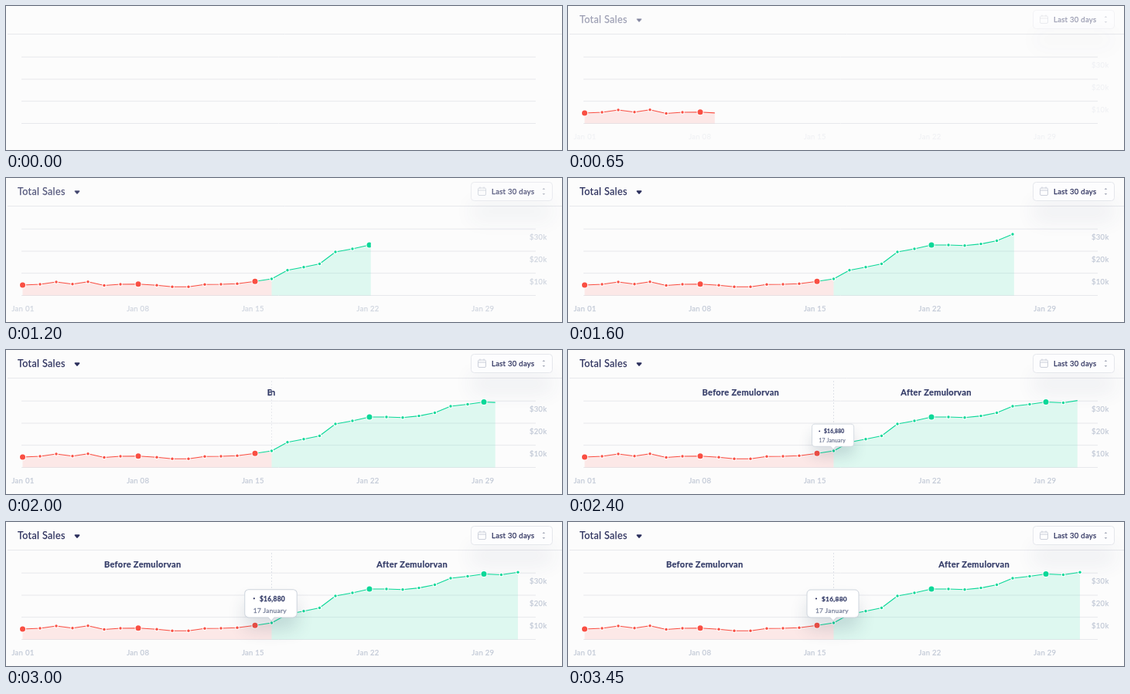
An HTML page with a canvas for the animation above (3.5 s loop, 719 by 187 pixels).

```html
<!DOCTYPE html>
<html lang="en">
<head>
<meta charset="utf-8">
<title>Total Sales</title>
<style>
  html, body { margin: 0; width: 100%; height: 100%; overflow: hidden; background: #fcfcfc; }
  canvas { display: block; width: 719px; height: 187px; }
</style>
</head>
<body>
<canvas id="chart"></canvas>
<script>
const W = 719, H = 187, LOOP = 3500, STEP = 50;
const BASE = 152.5, SPLIT = 343.5;
const INK = '#2b2f5c', RED = '#f94f43', GREEN = '#0bd898', GRID = '#e7e8ec', AXIS = '#c3cad7';
const BRAND = 'Zemulorvan';

const points = [
  [21.5, 139], [44, 138], [65, 135], [86, 137.7], [106, 134.8], [127, 139.5], [148, 138], [171, 137.8],
  [195, 139.2], [215, 141.2], [236, 141.2], [257, 138.2], [278, 138], [299, 137.3], [322, 134.3],
  [343.5, 131], [364, 119.8], [385, 115.8], [405.5, 111.5], [426, 96], [448, 92], [470, 87],
  [492, 87], [513, 87.7], [534, 85.6], [554.5, 81.5], [575, 73], [597, 70.5], [618, 67.5],
  [640.5, 68.5], [662, 65.2]
];

const dpr = window.devicePixelRatio || 1;
const canvas = document.getElementById('chart');
canvas.width = W * dpr;
canvas.height = H * dpr;
const ctx = canvas.getContext('2d');

const progress = (t, start, duration) => Math.min(1, Math.max(0, (t - start) / duration));

// cubic-bezier(x1, 0, x2, 1) solved by bisection
function ease(x, x1, x2) {
  let lo = 0, hi = 1, s = 0.5;
  for (let i = 0; i < 24; i++) {
    s = (lo + hi) / 2;
    const bx = 3 * (1 - s) ** 2 * s * x1 + 3 * (1 - s) * s * s * x2 + s ** 3;
    if (bx < x) lo = s; else hi = s;
  }
  return s * s * (3 - 2 * s);
}

function layer(alpha, draw) {
  if (alpha <= 0) return;
  ctx.save();
  ctx.globalAlpha = alpha;
  draw();
  ctx.restore();
}

function clipX(left, right) {
  ctx.beginPath();
  ctx.rect(left, 0, right - left, H);
  ctx.clip();
}

function text(str, x, y, size, color, { weight = 400, align = 'left' } = {}) {
  ctx.font = `${weight} ${size}px Lato, sans-serif`;
  ctx.letterSpacing = size * 0.03 + 'px';
  ctx.textAlign = align;
  ctx.fillStyle = ctx.strokeStyle = color;
  ctx.lineWidth = 0.25;
  ctx.fillText(str, x, y);
  ctx.strokeText(str, x, y);
}

function path(list, { fill, stroke, width = 1, close = false }) {
  ctx.beginPath();
  list.forEach(([x, y]) => ctx.lineTo(x, y));
  if (close) ctx.closePath();
  if (fill) { ctx.fillStyle = fill; ctx.fill(); }
  if (stroke) { ctx.strokeStyle = stroke; ctx.lineWidth = width; ctx.stroke(); }
}

function circle(x, y, r, color) {
  ctx.beginPath();
  ctx.arc(x, y, r, 0, 7);
  ctx.fillStyle = color;
  ctx.fill();
}

function setShadow(color, blur, offset) {
  ctx.shadowColor = color;
  ctx.shadowBlur = blur * dpr;
  ctx.shadowOffsetY = offset * dpr;
}

function drawGrid() {
  path([[2, 36.5], [W, 36.5]], { stroke: GRID });
  for (const y of [66.2, 95, 123.7, BASE]) path([[20, y], [685, y]], { stroke: GRID });
}

function drawHeader() {
  text('Total Sales', 15, 22, 12.5, INK);
  ctx.lineJoin = 'round';
  path([[89.5, 17.2], [94.5, 17.2], [92, 20]], { fill: INK, stroke: INK, width: 1.8, close: true });

  ctx.beginPath();
  ctx.roundRect(601.5, 5.5, 105, 24, 4);
  ctx.save();
  setShadow('rgba(60,70,110,0.07)', 26, 26);
  ctx.fillStyle = '#fdfdfe';
  ctx.fill();
  ctx.restore();
  ctx.strokeStyle = '#e5e7ec';
  ctx.lineWidth = 1;
  ctx.stroke();

  const icon = '#ccd0da';
  ctx.beginPath();
  ctx.roundRect(610.5, 13, 10, 9.5, 1.5);
  ctx.strokeStyle = icon;
  ctx.stroke();
  path([[610.5, 16], [620.5, 16]], { stroke: icon });
  for (const x of [613, 618]) path([[x, 11.5], [x, 13.5]], { stroke: icon });
  text('Last 30 days', 628, 21, 9.5, INK);
  for (const dir of [-1, 1]) {
    const y = 17.5 + dir * 2.4;
    path([[693.6, y], [697.2, y], [695.4, y + dir * 2.2]], { fill: '#a4a9b8', close: true });
  }
}

function drawAxes() {
  for (let k = 0; k < 5; k++) {
    const day = String(1 + 7 * k).padStart(2, '0');
    text('Jan ' + day, 22 + 148.7 * k, 173, 9.5, AXIS, { align: 'center' });
  }
  for (let k = 0; k < 3; k++) text(`$${30 - 10 * k}k`, 677, 80 + 29 * k, 9.5, AXIS);
}

function drawSeries(edge) {
  clipX(0, edge);
  const area = (list, fill) =>
    path([...list, [list[list.length - 1][0], BASE], [list[0][0], BASE]], { fill });
  area(points.slice(0, 16), 'rgba(249,79,67,0.11)');
  area(points.slice(15), 'rgba(11,216,152,0.12)');
  ctx.lineJoin = 'round';
  path(points.slice(0, 15), { stroke: RED, width: 1.1 });
  path(points.slice(14), { stroke: GREEN, width: 1.1 });
  points.forEach(([x, y], i) => {
    const r = i % 7 ? 1.7 : 3.5;
    circle(x, y, r + 1, '#fff');
    circle(x, y, r, i < 15 ? RED : GREEN);
  });
}

function drawDivider() {
  ctx.setLineDash([2, 2]);
  path([[SPLIT, 40], [SPLIT, 130]], { stroke: '#dfe2e8' });
}

function drawHeadings(p) {
  const style = { weight: 700 };
  layer(1, () => {
    clipX(0, SPLIT);
    text('Before ' + BRAND, 127 + 216 * (1 - p), 59, 11, '#343c68', style);
  });
  layer(1, () => {
    clipX(SPLIT, W);
    text('After ' + BRAND, 571 - 228 * (1 - p), 59, 11, '#343c68', { ...style, align: 'right' });
  });
}

// Drawn around its pointer tip so that it scales from there
function drawTooltip(scale) {
  ctx.translate(343, 130.5);
  ctx.scale(scale, scale);
  ctx.beginPath();
  ctx.moveTo(-4, -6.5);
  ctx.lineTo(0, -2);
  ctx.lineTo(4, -6.5);
  ctx.arcTo(33, -6.5, 33, -12, 5);
  ctx.arcTo(33, -42.5, 27, -42.5, 5);
  ctx.arcTo(-34, -42.5, -34, -36, 5);
  ctx.arcTo(-34, -6.5, -28, -6.5, 5);
  ctx.closePath();
  ctx.save();
  setShadow('rgba(40,60,90,0.16)', 22 * scale, 15 * scale);
  ctx.fillStyle = '#fff';
  ctx.fill();
  ctx.restore();
  ctx.strokeStyle = '#cdd4dc';
  ctx.lineWidth = 1;
  ctx.stroke();
  circle(-22, -31, 1.1, INK);
  text('$16,880', -15, -27.5, 8.4, '#343c68', { weight: 700 });
  text('17 January', -23, -12.5, 8.4, '#727b96');
}

function tooltipScale(t) {
  const grow = ease(progress(t, 2210, 450), 0.31, 0.2);
  const settle = ease(progress(t, 2670, 430), 0.33, 0.3);
  return 1.16 * grow - 0.16 * settle;
}

function draw(t) {
  ctx.setTransform(dpr, 0, 0, dpr, 0, 0);
  ctx.fillStyle = '#fcfcfc';
  ctx.fillRect(0, 0, W, H);

  drawGrid();
  layer(progress(t, 50, 1500), drawHeader);
  layer(progress(t, 500, 1000), drawAxes);
  layer(progress(t, 1800, 300), drawDivider);
  layer(1, () => drawSeries(17 + 648 * ease(progress(t, 50, 2700), 0.31, 0.2)));
  if (t > 1930) drawHeadings(ease(progress(t, 1930, 880), 0.31, 0.3));
  const scale = tooltipScale(t);
  if (scale > 0.01) layer(1, () => drawTooltip(scale));
}

function tick() {
  const t = performance.now() % LOOP;
  draw(Math.floor(t / STEP) * STEP);
  requestAnimationFrame(tick);
}
tick();
</script>
</body>
</html>
```
